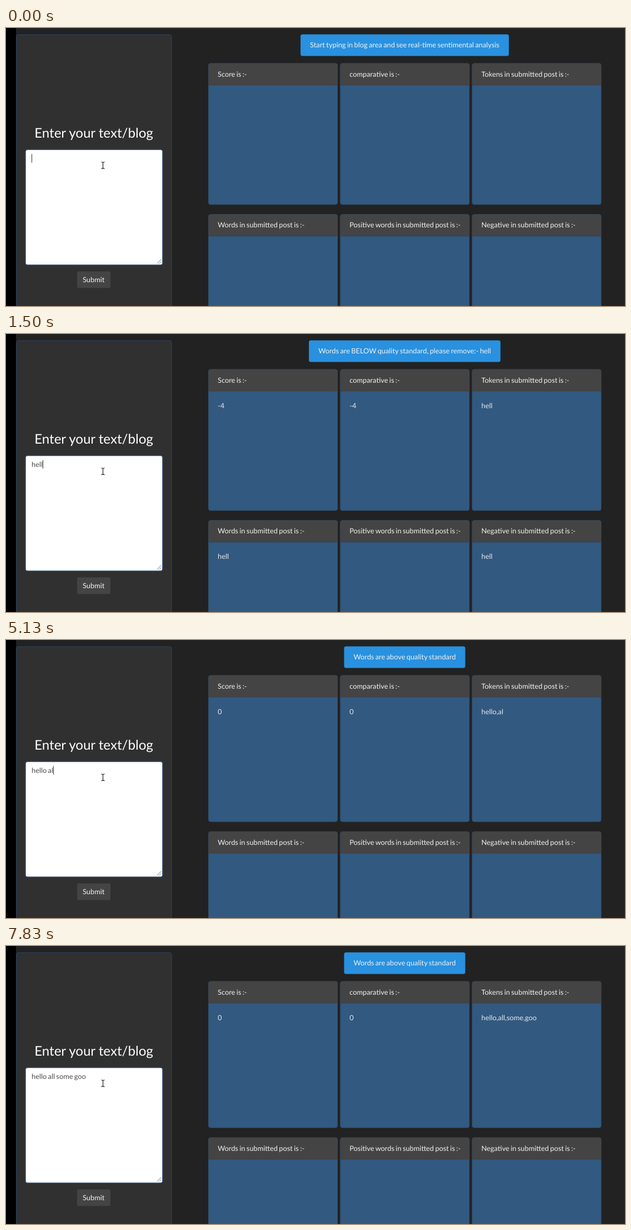
Animation, 1114 px wide and 502 px high, one loop 8000 ms. Source, as an HTML page:

```html
<!DOCTYPE html>
<html lang="en">
<head>
<meta charset="utf-8">
<title>Sentiment analysis demo</title>
<style>
html, body { margin: 0; width: 100%; height: 100%; overflow: hidden; background: #222; }
svg { display: block; }
text { font: 12.8px Lato, sans-serif; word-spacing: -.9px; fill: #f2f2f2; text-rendering: geometricPrecision; white-space: pre; }
.mid { text-anchor: middle; }
.title { font-size: 24.1px; word-spacing: 0; fill: #fff; }
.value { fill: #e4eaf0; }
.typed { fill: #4c4c4c; }
.panel { fill: #303030; stroke: #2b4565; }
.card { fill: #32597f; stroke: #305174; }
.head { fill: #444; }
</style>
</head>
<body>
<svg id="stage" width="1114" height="502" viewBox="0 0 1114 502">
  <rect width="18" height="502"/>
  <rect class="panel" x="18.5" y="12" width="279.5" height="520" rx="3.5"/>
  <text class="title mid" x="158" y="197.5">Enter your text/blog</text>
  <rect x="34" y="218.5" width="249" height="210.5" rx="5" fill="#2b4363"/>
  <rect x="35.7" y="220.2" width="245.5" height="207" rx="3" fill="#fff"/>
  <path d="M271.5 425.5l8-8M275.5 425.5l4-4" stroke="#777" fill="none"/>
  <rect class="head" x="128" y="439.5" width="60" height="30" rx="3"/>
  <text class="mid" x="157.7" y="459">Submit</text>
  <rect id="banner" y="11.5" height="39" rx="3.5" fill="#2991df"/>
  <text id="message" class="mid" x="717.5" y="35.3"></text>
  <g id="cards"></g>
  <text id="typed" class="typed" x="46" y="239.5"></text>
  <rect id="caret" y="227.5" width="1" height="15.5" fill="#333"/>
  <path d="M171.5 242q2 0 3 1q1-1 3-1M174.5 243v10M171.5 254q2 0 3-1q1 1 3 1" fill="none" stroke="#222" stroke-width="1.2"/>
</svg>
<script>
const LOOP = 8000;
const SENTENCE = 'hello all some goo';
const KEY_TIMES = [30, 430, 770, 1170, 3100, 3470, 3600, 5130, 5300, 5470,
                   5730, 5870, 6000, 6630, 6770, 6870, 7000, 7130];
const CARET_OFF = [[1770, 2330], [2930, 3100], [4230, 5130], [7830, LOOP]];
const TITLES = ['Score is :-', 'comparative is :-', 'Tokens in submitted post is :-',
  'Words in submitted post is :-', 'Positive words in submitted post is :-', 'Negative in submitted post is :-'];

const $ = id => document.getElementById(id);
const set = (el, attrs) => { for (const k in attrs) el.setAttribute(k, attrs[k]); };

$('cards').innerHTML = TITLES.map(title => `
  <g>
    <rect class="card" x=".5" y=".5" width="232" rx="3.5"/>
    <path class="head" d="M.5 39.5V4q0-3.5 3.5-3.5H229q3.5 0 3.5 3.5V39.5z"/>
    <path d="M.5 39.5h232" stroke="#34414f"/>
    <text x="17" y="24">${title}</text>
    <text class="value" x="17" y="70"></text>
  </g>`).join('');
const cards = [...$('cards').children];

function analyse(text) {
  const bad = text === 'hell';
  const score = text && (bad ? '-4' : '0');
  const word = bad ? text : '';
  return {
    bad,
    values: [score, score, text.replaceAll(' ', ','), word, '', word],
    message: !text ? 'Start typing in blog area and see real-time sentimental analysis'
      : bad ? 'Words are BELOW quality standard, please remove:- hell'
      : 'Words are above quality standard'
  };
}

function show(text) {
  const { bad, values, message } = analyse(text);
  const grow = text && !bad ? 9.3 : 0;
  cards.forEach((card, i) => {
    const y = i < 3 ? 63.5 : 336.3 + grow;
    set(card, { transform: `translate(${364 + i % 3 * 237.25} ${y})` });
    set(card.firstElementChild, { height: 254.7 + grow });
    card.lastElementChild.textContent = values[i];
  });
  $('message').textContent = message;
  const width = $('message').getComputedTextLength() + 34;
  set($('banner'), { x: 717.5 - width / 2, width });

  // A trailing space still has to move the caret.
  $('typed').textContent = text.replaceAll(' ', '\u00a0');
  set($('caret'), { x: 46 + Math.round(text && $('typed').getComputedTextLength()) });
}

let shown = null;
function draw(now) {
  const t = now % LOOP;
  const text = SENTENCE.slice(0, KEY_TIMES.filter(k => k <= t).length);
  if (text !== shown) show(shown = text);
  const off = CARET_OFF.some(([from, to]) => t >= from && t < to);
  set($('caret'), { visibility: off ? 'hidden' : 'visible' });
}

const start = performance.now();
function tick() {
  draw(performance.now() - start);
  requestAnimationFrame(tick);
}
draw(0);
requestAnimationFrame(tick);
</script>
</body>
</html>
```
